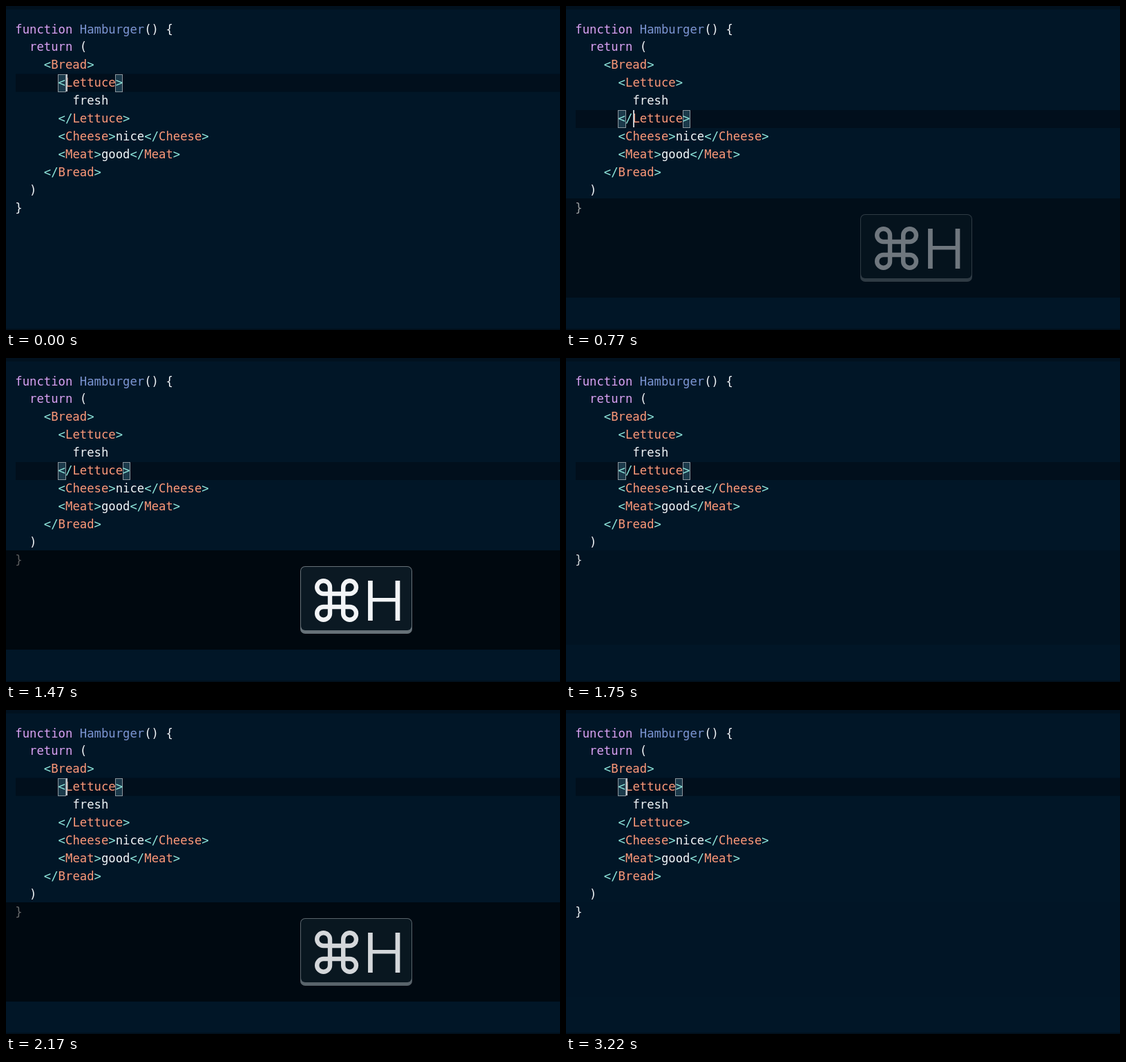
Animation, 802 px wide and 470 px high, one loop 3.29 s. Source, as an HTML page:

```html
<!DOCTYPE html>
<html lang="en">
<head>
<meta charset="utf-8">
<title>Jumping between matching tags</title>
<style>
  html, body { margin: 0; width: 100%; height: 100%; overflow: hidden; background: #011627; }
  svg { display: block; }
  #code text { font: 17.25px "DejaVu Sans Mono", monospace; white-space: pre; }
  .k { fill: #d9a1f3; }
  .f { fill: #7c95d2; }
  .t { fill: #fd9878; }
  .b { fill: #8fe6dc; }
  .w { fill: #f1f4f7; }
  .match rect { fill: #1b394a; stroke: #8a949b; }
  #h { font: 85px "Liberation Sans", Arial, sans-serif; fill: #f2f4f6; stroke: #0b1923; stroke-width: 1.2; }
</style>
</head>
<body>
<svg width="802" height="470" viewBox="0 0 802 470">
  <rect width="802" height="470" fill="#011627"/>
  <rect width="802" height="5" fill="#01111f"/>
  <rect y="468" width="802" height="2" fill="#01101c"/>
  <rect id="row" x="14" width="788" height="26" fill="#010f1c"/>
  <g class="match">
    <rect id="open" x="75.5" width="11" height="25"/>
    <rect id="close" width="10" height="25"/>
  </g>
  <g id="code"></g>
  <rect id="caret" width="2" height="25" fill="#c3c9ce"/>
  <rect id="band" y="279" width="802" height="144"/>
  <g id="key">
    <rect x="426" y="302" width="162" height="98" rx="7" fill="#667178"/>
    <rect x="427" y="303" width="160" height="92" rx="6" fill="#0b1923"/>
    <path fill="none" stroke="#f2f4f6" stroke-width="6.4" d="M469 332.6
      A9.4 9.4 0 1 0 459.6 342 H497.6
      A9.4 9.4 0 1 0 488.2 332.6 V370.4
      A9.4 9.4 0 1 0 497.6 361 H459.6
      A9.4 9.4 0 1 0 469 370.4 Z"/>
    <text id="h" x="516.4" y="381.4">H</text>
  </g>
</svg>
<script>
const LOOP = 3290, STEP = 70;
const LEFT = 13.3, CELL = 10.385, PITCH = 25.9, BASE = 39.5;
const NS = "http://www.w3.org/2000/svg";
const $ = id => document.getElementById(id);
const set = (id, attrs) => {
  for (const name in attrs) $(id).setAttribute(name, attrs[name]);
};

// Each line: indent, then class/text pairs
const lines = [
  [0, "k", "function ", "f", "Hamburger", "w", "() {"],
  [2, "k", "return ", "w", "("],
  [4, "b", "<", "t", "Bread", "b", ">"],
  [6, "b", "<", "t", "Lettuce", "b", ">"],
  [8, "w", "fresh"],
  [6, "b", "</", "t", "Lettuce", "b", ">"],
  [6, "b", "<", "t", "Cheese", "b", ">", "w", "nice", "b", "</", "t", "Cheese", "b", ">"],
  [6, "b", "<", "t", "Meat", "b", ">", "w", "good", "b", "</", "t", "Meat", "b", ">"],
  [4, "b", "</", "t", "Bread", "b", ">"],
  [2, "w", ")"],
  [0, "w", "}"]
];
lines.forEach(([indent, ...parts], n) => {
  const line = document.createElementNS(NS, "text");
  line.setAttribute("x", LEFT + indent * CELL);
  line.setAttribute("y", BASE + n * PITCH);
  for (let i = 0; i < parts.length; i += 2) {
    const span = document.createElementNS(NS, "tspan");
    span.setAttribute("class", parts[i]);
    span.textContent = parts[i + 1];
    line.append(span);
  }
  $("code").append(line);
});

const JUMP = 755, BACK = 1980;      // caret moves
const PRESSES = [600, 1840];        // shortcut overlay starts
const RISE = 375, HOLD = 950, TAIL = 500;

function overlay(t) {
  for (const start of PRESSES) {
    const age = t - start;
    if (age < 0) continue;
    if (age < HOLD) {
      const key = Math.min(1, age / RISE);
      return { key, band: 0.62 * key ** 0.7, height: 144 };
    }
    if (age < HOLD + TAIL && t < PRESSES[1] || start === PRESSES[1]) {
      const rest = Math.max(0, 1 - (age - HOLD) / TAIL);
      return { key: 0, band: 0.2 * rest, height: 137 };
    }
  }
  return { key: 0, band: 0, height: 144 };
}

function draw(t) {
  const atEnd = t >= JUMP && t < BACK;
  const moved = atEnd ? JUMP : t >= BACK ? BACK : BACK - LOOP;
  const lit = Math.floor((t - moved) / 500) % 2 === 0;
  const top = atEnd ? 151 : 98;
  set("row", { y: top + (atEnd ? 0 : 0.5) });
  const boxY = atEnd ? 151.5 : 99.5;
  set("open", { y: boxY });
  set("close", { x: atEnd ? 169.5 : 158.5, y: boxY });
  set("caret", { x: atEnd ? 97 : 87, y: boxY - 0.5, opacity: lit ? 1 : 0 });
  const o = overlay(t);
  set("band", { opacity: o.band, height: o.height });
  set("key", { opacity: o.key });
}

const begin = performance.now();
function tick() {
  const t = (performance.now() - begin) % LOOP;
  draw(Math.floor(t / STEP) * STEP);
  requestAnimationFrame(tick);
}
tick();
</script>
</body>
</html>
```
